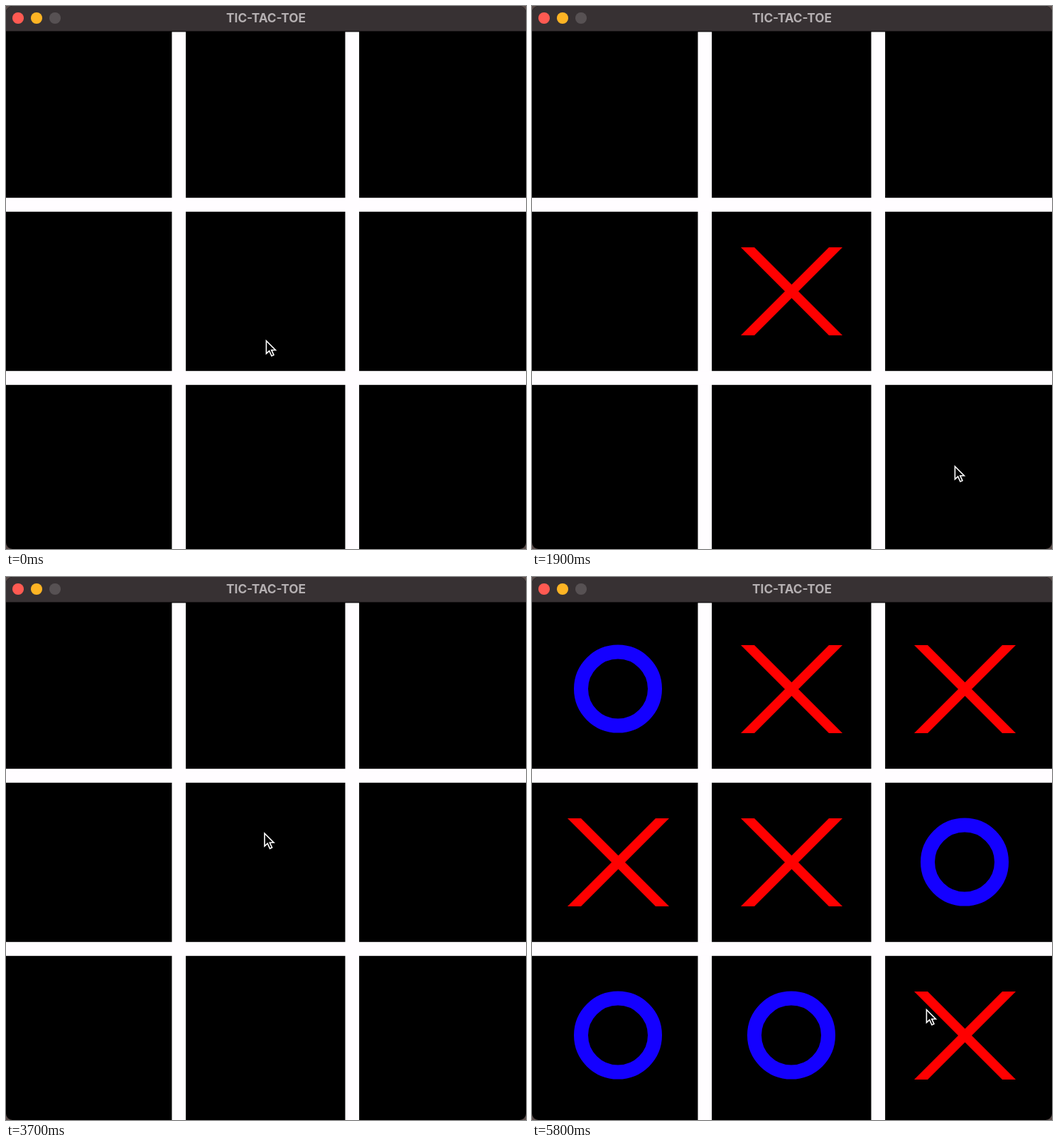
Write an HTML page with a canvas that moves like this. It is 732 by 765 pixels and loops after 5900 ms.

```html
<!DOCTYPE html>
<html lang="en">
<head>
<meta charset="utf-8">
<title>TIC-TAC-TOE</title>
<style>
  html, body { margin: 0; width: 100%; height: 100%; overflow: hidden; background: #5a4d4b; }
  #window { position: relative; width: 732px; height: 765px; border-radius: 9px; overflow: hidden; background: #000; }
  header { height: 35px; border-bottom: 1px solid #191517; background: #373133;
    color: #b5b0b2; font: 700 17.2px/33px Inter, Roboto, sans-serif; text-align: center; }
  header i { position: absolute; top: 9.2px; width: 15.6px; height: 15.6px; border-radius: 50%; }
  canvas { position: absolute; left: 0; top: 0; }
</style>
</head>
<body>
<div id="window">
  <header>
    <i style="left:9.2px;background:#ff5a52"></i>
    <i style="left:35.2px;background:#fdb424"></i>
    <i style="left:61.2px;background:#575153"></i>
    TIC-TAC-TOE
  </header>
  <canvas width="732" height="765"></canvas>
</div>
<script>
const ctx = document.querySelector('canvas').getContext('2d');
const LOOP = 5900, STEP = 100, CELL = 244, TOP = 36;
const COLORS = { X: '#ff0000', O: '#1400ff' };
const CELLS = [...Array(9).keys()];

// The pointer stops at [time, x, y] and clicks there, except when a round starts.
const rounds = [0, 1900, 3300];
const stops = [
  [0, 366, 470], [200, 366, 472], [800, 364, 616], [1200, 579, 450], [1600, 595, 647],
  [1900, 595, 647], [2400, 84, 652], [2800, 349, 658],
  [3800, 364, 351], [4100, 590, 166], [4400, 170, 407], [4800, 343, 147], [5200, 555, 608]
];

const cellAt = (x, y) => Math.floor(x / CELL) + 3 * Math.floor((y - TOP) / CELL);
const center = cell => [121.5 + cell % 3 * CELL, 158 + Math.floor(cell / 3) * CELL];

const lines = [[0, 4, 8], [2, 4, 6]];
for (let i = 0; i < 3; i++) lines.push([3 * i, 3 * i + 1, 3 * i + 2], [i, i + 3, i + 6]);
const winLine = (board, mark) => lines.find(line => line.every(c => board[c] === mark));

// The computer blocks a threat, else takes the centre, else the first free cell.
function reply(board, mark, rival) {
  const free = CELLS.filter(c => !board[c]);
  if (!free.length) return;
  const threat = free.find(c => winLine({ ...board, [c]: rival }, rival));
  board[threat ?? (free.includes(4) ? 4 : free[0])] = mark;
}

// Plays the current round up to time t; X always opens, the sides swap each round.
function boardAt(t) {
  const round = rounds.findLastIndex(start => start <= t), start = rounds[round];
  const [human, computer] = round % 2 ? 'OX' : 'XO';
  const board = {};
  if (computer === 'X') reply(board, computer, human);
  for (const [time, x, y] of stops) {
    if (time <= start || time > t) continue;
    board[cellAt(x, y)] = human;
    reply(board, computer, human);
  }
  return board;
}

function pointerAt(t) {
  const i = stops.findIndex(s => s[0] > t);
  if (i < 0) return stops.at(-1).slice(1);
  const [t0, x0, y0] = stops[i - 1], [t1, x1, y1] = stops[i];
  const u = (t - t0) / (t1 - t0), k = u * u * (3 - 2 * u);
  return [x0 + (x1 - x0) * k, y0 + (y1 - y0) * k];
}

function poly(points) {
  ctx.beginPath();
  points.forEach(p => ctx.lineTo(...p));
  ctx.closePath();
}

function drawGrid() {
  ctx.fillStyle = '#fffdff';
  for (const i of [1, 2]) {
    ctx.fillRect(i * CELL - 10.5, TOP + 0.5, 19.6, 729);
    ctx.fillRect(0, TOP + i * CELL - 9.8, 732, 19.6);
  }
}

function drawMark(cell, mark) {
  const [x, y] = center(cell);
  ctx.fillStyle = ctx.strokeStyle = COLORS[mark];
  if (mark === 'O') {
    ctx.lineWidth = 20;
    ctx.beginPath();
    ctx.arc(x - 0.5, y - 0.4, 52, 0, 2 * Math.PI);
    ctx.stroke();
    return;
  }
  for (const s of [-1, 1]) {
    poly([[x - 71.5 * s, y - 62], [x - 52.5 * s, y - 62], [x + 71.5 * s, y + 62], [x + 52.5 * s, y + 62]]);
    ctx.fill();
  }
}

function drawWin(line, mark) {
  const [x0, y0] = center(line[0]), [x1, y1] = center(line[2]);
  ctx.strokeStyle = COLORS[mark];
  ctx.lineWidth = x0 === x1 || y0 === y1 ? 20 : 14;
  ctx.beginPath();
  ctx.moveTo(x0, y0);
  ctx.lineTo(x1, y1);
  ctx.stroke();
}

function drawPointer(x, y) {
  ctx.save();
  ctx.translate(x + 0.4, y + 1.6);
  poly([[0, 0], [0, 18], [4.2, 14.2], [7.5, 21.4], [10.5, 20], [7.3, 13.1], [13, 13.1]]);
  ctx.fillStyle = '#000';
  ctx.strokeStyle = '#fff';
  ctx.lineWidth = 1.6;
  ctx.fill();
  ctx.stroke();
  ctx.restore();
}

function draw(now) {
  const t = Math.floor(now % LOOP / STEP) * STEP;
  const board = boardAt(t);
  ctx.clearRect(0, 0, 732, 765);
  drawGrid();
  for (const cell in board) drawMark(cell, board[cell]);
  for (const mark of 'XO') {
    const line = winLine(board, mark);
    if (line) drawWin(line, mark);
  }
  drawPointer(...pointerAt(t));
}

const begin = performance.now();
function tick() {
  draw(performance.now() - begin);
  requestAnimationFrame(tick);
}
tick();
</script>
</body>
</html>
```
